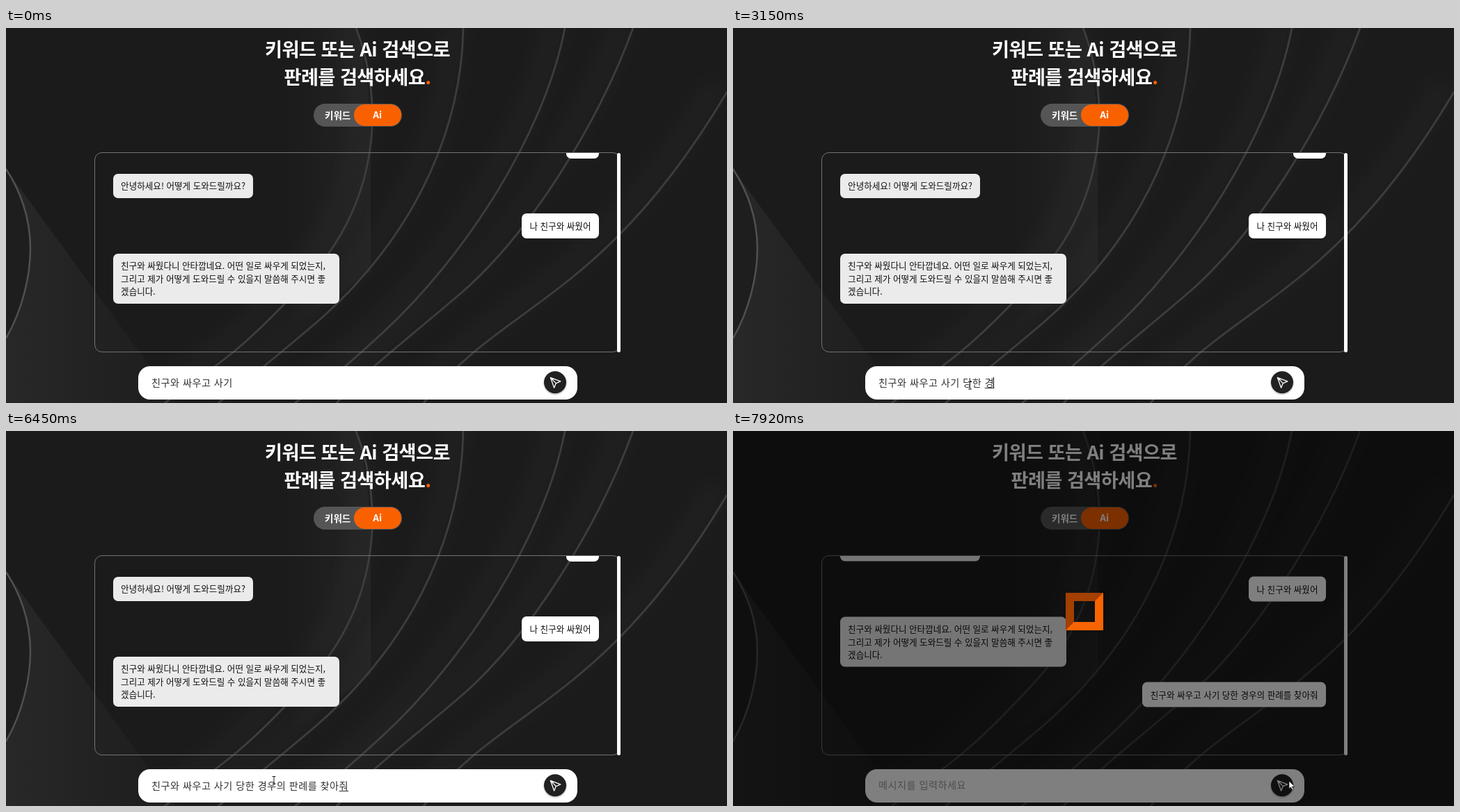
An HTML page that plays this animation: 1036 by 540 pixels, repeating every 7990 ms.

```html
<!DOCTYPE html>
<html lang="ko">
<head>
<meta charset="utf-8">
<style>
  html, body { margin: 0; width: 100%; height: 100%; overflow: hidden; background: #1b1b1b; }
  #stage { position: relative; width: 1036px; height: 540px; overflow: hidden;
    font-family: "Noto Sans CJK KR", "Noto Sans KR", "Noto Sans CJK", sans-serif; }
  #stage > *, .bubble, #knob { position: absolute; }
  svg { left: 0; top: 0; display: block; }
  #title { left: 5px; top: 10px; width: 1000px; text-align: center; letter-spacing: -.02em;
    font: 700 27.2px/39.7px "Noto Sans CJK KR", "Noto Sans KR", sans-serif; color: #fff; }
  #title i { font-style: normal; color: #f96100; }
  #toggle { left: 442px; top: 108.5px; width: 127px; height: 33.5px; border-radius: 17px; background: #555;
    color: #fff; font-weight: 700; font-size: 13.5px; line-height: 32.5px; }
  #toggle span { position: absolute; left: 16px; }
  #knob { left: 58px; top: 1.5px; width: 67.5px; height: 30.5px; border-radius: 16px;
    background: #f96100; text-align: center; line-height: 29.5px; }
  #frame { left: 127px; top: 179px; width: 754px; height: 286px; border: 1px solid #737373; border-radius: 11px; }
  #clip { left: 128px; top: 180px; width: 750px; height: 286px; overflow: hidden; }
  #list { position: absolute; inset: 0; }
  #bar { left: 877.5px; top: 179.5px; width: 5.5px; height: 287px; border-radius: 3px; background: #fff; }
  .bubble { box-sizing: border-box; padding: 8.5px 11.5px; min-height: 35.5px; border-radius: 7px;
    font-size: 12.57px; line-height: 18.4px; white-space: pre; color: #111; background: #fff; }
  .bot { left: 25.6px; background: #ebebeb; }
  .me { right: 26px; }
  #field { left: 190px; top: 487px; width: 631px; height: 47.5px; border-radius: 17px; background: #fff; }
  #text { left: 209px; top: 499px; font-size: 14.2px; font-weight: 300; line-height: 22px;
    letter-spacing: .45px; white-space: pre; }
  #text u { text-decoration: underline 1px; text-underline-offset: 2px; }
  #text b { position: relative; }
  #text b::after { content: ""; position: absolute; left: -1px; bottom: 1px; width: 1px; height: 16px; background: #000; }
  #shade { inset: 0; background: rgba(0, 0, 0, .5); }
  #loader { left: 478.3px; top: 233.3px; width: 30.4px; height: 30.4px; border: 12px solid;
    border-color: #a34000 #f96400 #f96400 #a34000; }
</style>
</head>
<body>
<div id="stage">
  <svg id="back" width="1036" height="540" viewBox="0 0 1036 540" fill="none">
    <defs>
      <linearGradient id="fan" x1="0" y1="0" x2="1" y2="0">
        <stop stop-color="#282828"/><stop offset="1" stop-color="#1d1d1d"/>
      </linearGradient>
      <linearGradient id="leaf" gradientUnits="userSpaceOnUse" x1="400" y1="0" x2="524" y2="0">
        <stop stop-color="#fff" stop-opacity="0"/><stop offset="1" stop-color="#fff" stop-opacity=".035"/>
      </linearGradient>
      <filter id="soft" filterUnits="userSpaceOnUse" x="-100" y="-100" width="1300" height="800">
        <feGaussianBlur stdDeviation="12"/>
      </filter>
    </defs>
    <rect width="1036" height="540" fill="#1b1b1b"/>
    <path d="M0 203L245 540H0Z" fill="url(#fan)"/>
    <path d="M0 203C24 240 35 280 35 318S24 405 0 447Z" fill="#1e1e1e"/>
    <path d="M0 203C24 240 35 280 35 318S24 405 0 447" stroke="#505050" stroke-width="2.5"/>
    <path d="M400 0H503C520 60 524 120 524 200V350L400 440Z" fill="url(#leaf)"/>
    <g id="lines"></g>
  </svg>

  <div id="title">키워드 또는 Ai 검색으로<br>판례를 검색하세요<i>.</i></div>
  <div id="toggle"><span>키워드</span><div id="knob">Ai</div></div>

  <div id="frame"></div>
  <div id="clip"><div id="list">
    <div class="bubble me" style="top:-28px;width:47px"></div>
    <div class="bubble bot" style="top:29.8px">안녕하세요! 어떻게 도와드릴까요?</div>
    <div class="bubble me" style="top:87.1px">나 친구와 싸웠어</div>
    <div class="bubble bot" style="top:144.7px;width:325.5px">친구와 싸웠다니 안타깝네요. 어떤 일로 싸우게 되었는지,
그리고 제가 어떻게 도와드릴 수 있을지 말씀해 주시면 좋
겠습니다.</div>
    <div class="bubble me" id="sent" style="top:239.2px">친구와 싸우고 사기 당한 경우의 판례를 찾아줘</div>
  </div></div>
  <div id="bar"></div>

  <div id="field"></div>
  <div id="text"></div>
  <svg width="1036" height="540" viewBox="0 0 1036 540" fill="none">
    <circle cx="789" cy="511.5" r="17" fill="#000" opacity=".15"/>
    <circle cx="789" cy="510.3" r="16" fill="#212121"/>
    <path d="M782.3 503.3L796.8 508.8L790.3 511.6L787.6 518Z M782.3 503.3L790.3 511.6"
      stroke="#fff" stroke-width="1.3" stroke-linejoin="round"/>
  </svg>

  <div id="shade"></div>
  <div id="loader"></div>
  <svg width="1036" height="540" viewBox="0 0 1036 540">
    <g id="mouse">
      <circle id="ring" r="10" cy=".8" fill="#ff0" fill-opacity=".5"/>
      <path id="arrow" d="M0 0V11.2L2.6 8.8L4.4 12.8L6.2 12L4.5 8.1H8Z" fill="#fff" stroke="#111" stroke-width=".7"/>
      <path id="beam" d="M-2.5 -5.5H2.5M0 -5.5V5M-2.5 5H2.5" stroke="#222" fill="none"/>
    </g>
  </svg>
</div>

<script>
const LOOP = 7990, SEND = 7500, BLINK = 530;
const $ = id => document.getElementById(id);
const show = (id, on) => { $(id).style.visibility = on ? 'visible' : 'hidden'; };

const curves = [
  'M503 0C545 110 535 250 435 360S300 487 228 540',
  'M657 0C655 130 600 290 445 425Q372 487 305 540',
  'M803 0C775 150 660 330 540 440S440 520 415 540',
  'M901 0C850 140 750 300 650 385S525 487 475 540',
  'M1036 92C975 195 905 285 815 358S670 455 600 540'
];
$('lines').innerHTML = curves.map(d =>
  `<path d="${d}" transform="translate(-14 -10)" stroke="#fff" stroke-opacity=".02" stroke-width="34" filter="url(#soft)"/>` +
  `<path d="${d}" stroke="#3d3d3d" stroke-width="2.8"/>`).join('');

// Typing bursts: first key, last key, states as "fixed|composing"
const start = '친구와 싸우고 사기';
const bursts = [
  [820, 820, ['']],
  [1880, 1880, [' ']],
  [2080, 2280, [' |ㄷ', ' |다', ' |당']],
  [2480, 2690, [' 당|ㅎ', ' 당|하', ' 당|한', ' 당한 ']],
  [2890, 3220, [' 당한 |ㄱ', ' 당한 |겨', ' 당한 |경', ' 당한 경|우']],
  [3420, 3840, [' 당한 경|웅', ' 당한 경우|으', ' 당한 경우|의', ' 당한 경우의 ',
    ' 당한 경우의 |ㅍ', ' 당한 경우의 |파', ' 당한 경우의 |판']],
  [3990, 4120, [' 당한 경우의 판|ㄹ', ' 당한 경우의 판|례']],
  [4320, 4990, [' 당한 경우의 판|롈', ' 당한 경우의 판례|르', ' 당한 경우의 판례|를', ' 당한 경우의 판례를 ',
    ' 당한 경우의 판례를 |ㅊ', ' 당한 경우의 판례를 |차', ' 당한 경우의 판례를 |찾', ' 당한 경우의 판례를 찾|ㅇ']],
  [5120, 5120, [' 당한 경우의 판례를 찾|아']],
  [5650, 5790, [' 당한 경우의 판례를 찾|앚', ' 당한 경우의 판례를 찾아|주', ' 당한 경우의 판례를 찾아|줘']]
];
const keys = bursts.flatMap(([a, b, list]) =>
  list.map((s, i) => [a + (b - a) * i / Math.max(1, list.length - 1), s]));

// Pointer moves: begin, step length, evenly spaced points
const moves = [
  [310, 70, [[868, 528], [790, 488], [680, 467], [560, 472], [450, 492], [372, 509], [334, 514], [340.5, 515], [340.5, 515]]],
  [6320, 76, [[352, 513], [385, 503], [440, 490], [505, 480], [575, 475], [645, 476], [705, 482], [755, 490], [790, 498], [806, 503], [809, 504]]],
  [7150, 75, [[802, 504], [794, 504], [794, 504]]],
  [7500, 70, [[794, 504], [794, 504], [795, 504], [796, 504], [798, 504], [799, 504], [799, 504]]]
];

function pointer(t) {
  const m = moves.filter(m => t >= m[0]).pop();
  if (!m) return null;
  const [begin, step, points] = m;
  return points[Math.min(points.length - 1, Math.floor((t - begin + .01) / step))];
}

function textAt(t) {
  if (t >= SEND) return '메시지를 입력하세요';
  const key = keys.filter(k => t >= k[0]).pop();
  if (!key) return start;
  const [fixed, open = ''] = key[1].split('|');
  if (t >= 7220) return start + fixed + open;
  const caret = Math.floor((t - key[0]) / BLINK) % 2 === 0;
  return start + fixed + (open && `<u>${open}</u>`) + (caret ? '<b></b>' : '');
}

let shown;
function render(t) {
  const sent = t >= SEND;
  const html = textAt(t);
  if (html !== shown) $('text').innerHTML = shown = html;
  $('text').style.color = sent ? '#999' : '#333';
  $('text').style.top = sent ? '498px' : '499px';
  $('list').style.transform = sent ? 'translateY(-57.4px)' : '';
  show('sent', sent);
  show('shade', sent);
  show('loader', sent);
  if (sent) {
    const p = Math.min(1, Math.floor((t - SEND + .01) / 70) / 6);
    $('loader').style.opacity = .1 + .9 * p;
    $('loader').style.transform = `rotate(${45 * p - 45}deg) scale(${.67 + .33 * p})`;
  }

  const p = pointer(t);
  const inText = p && p[0] < 765 && p[1] > 488;
  show('arrow', p && !inText);
  show('beam', inText);
  show('ring', (t >= 730 && t < 870) || (t >= 7220 && t < SEND));
  if (p) $('mouse').setAttribute('transform', `translate(${p})`);
}

const t0 = performance.now();
function tick() {
  render((performance.now() - t0) % LOOP);
  requestAnimationFrame(tick);
}
tick();
</script>
</body>
</html>
```
